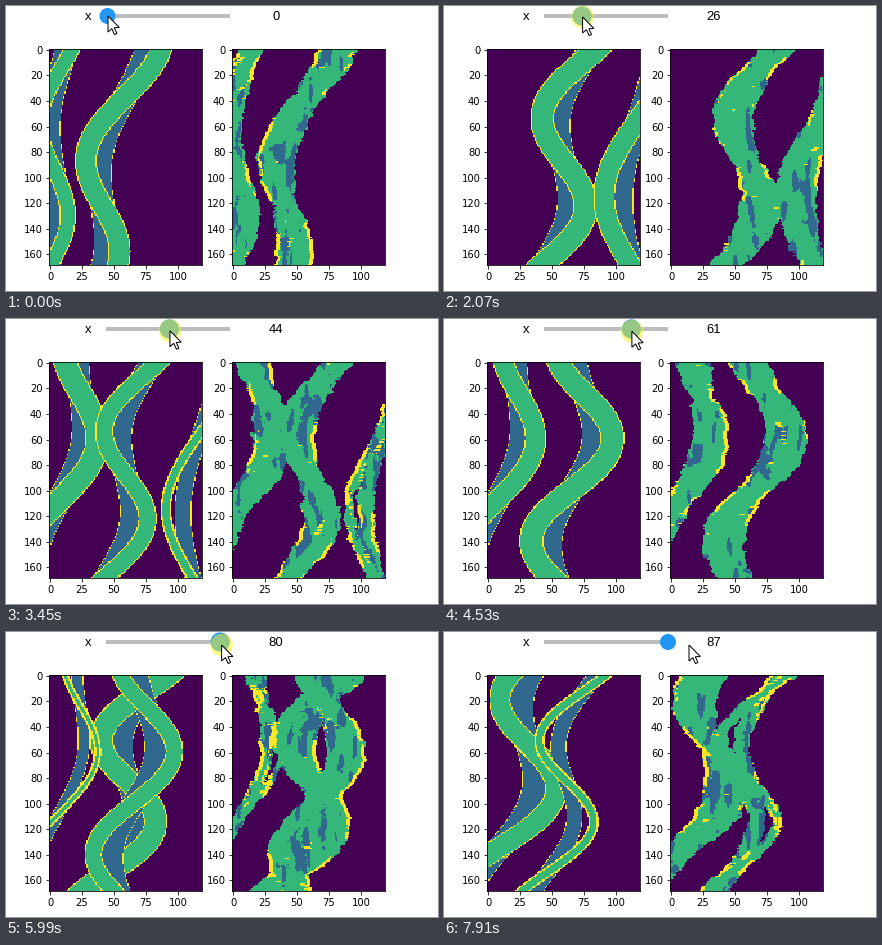
Write a matplotlib script that moves like this. It is 432x285 px and loops after 8 s.

```python
import numpy as np
import matplotlib.pyplot as plt
from matplotlib.animation import FuncAnimation
from matplotlib.colors import ListedColormap
from matplotlib.patches import Circle, Polygon, Rectangle

W, H = 432, 285
LOOP, STEP = 8000, 50
START, BEAT = 380, 76.4          # first slice change, time per slice
NY, NX = 169, 119
ROWS, COLS = np.mgrid[0:NY, 0:NX]
MUD, BAR, SAND, LEVEE = range(4)
FACIES = ListedColormap(["#440154", "#31688e", "#35b779", "#fde725"])

LIFE = 3150                      # time to cut from a channel's top to its base
HALF_WIDTH = 9.5
BAR_BEND = 0.45                  # the older bar meanders less than the sand

# birth, mid, tilt, bend, apex row, period; youngest cuts the ones after it
CHANNELS = [
    (-2050, 4, -0.06, 13, 55, 155),
    (-1100, 49, -0.20, 21, 80, 170),
    (600, 116, -0.05, 24, 112, 230),
    (1350, 60, -0.18, 23.5, 49, 156),
    (2950, 12, -0.20, -21, 66, 168),
    (3800, 67.5, -0.13, -26.5, 62, 150),
    (5000, 61, -0.20, 27.8, 47, 142),
    (6400, 23, -0.27, -32, 94, 162),
]


def band(grid, centre, half, edge, label):
    slope = np.sqrt(1 + np.gradient(centre) ** 2)[:, None]
    d = np.abs(COLS - centre[:, None])
    grid[d < half * slope] = LEVEE
    grid[d < half * slope - edge * np.sqrt(slope)] = label


def paint(grid, t, birth, mid, tilt, bend, apex, period):
    age = (t - birth) / LIFE
    if not 0 <= age < 1:
        return
    y = np.arange(NY)
    axis = mid + tilt * (y - NY // 2)
    swing = -bend * np.cos(2 * np.pi * (y - apex) / period)
    sand = HALF_WIDTH * np.sqrt(1 - age ** 2)
    bar = HALF_WIDTH * np.sqrt(1 - age ** 6)
    band(grid, axis + BAR_BEND * swing, bar, 0.5, BAR)
    band(grid, axis + swing, sand, 0.9 + 0.25 * max(0, 6 - sand), SAND)


def truth(t):
    grid = np.zeros((NY, NX), int)
    for channel in reversed(CHANNELS):
        paint(grid, t, *channel)
    return grid


rng = np.random.default_rng(7)


def noise(sy, sx):
    """Two smooth fields that are mixed over time."""
    fy = np.fft.fftfreq(NY)[:, None] * sy
    fx = np.fft.fftfreq(NX)[None, :] * sx
    low = np.exp(-2 * np.pi ** 2 * (fy ** 2 + fx ** 2))
    pair = np.fft.ifft2(np.fft.fft2(rng.standard_normal((2, NY, NX))) * low).real
    return pair / pair.std()


N_WARP, N_BAR, N_LEVEE, N_FINE = (noise(*s) for s in
                                  [(2.5, 2), (6, 1.9), (8, 4), (0.9, 0.9)])


def mix(pair, t):
    a = t / 420
    return np.cos(a) * pair[0] + np.sin(a) * pair[1]


def shifted(grid, dx):
    return grid[ROWS, np.clip(np.rint(COLS + dx), 0, NX - 1).astype(int)]


def prediction(grid, t):
    """A rough guess at the truth: ragged rims, stray bars and levees."""
    fine = mix(N_FINE, t)
    lab = shifted(grid, 0.8 * mix(N_WARP, t) + 0.4 * fine)
    mask = lab > MUD
    out = np.where(mask, SAND, MUD)
    streak = mix(N_BAR, t) + 0.2 * fine
    out[mask & (streak > np.where(lab == BAR, 0.35, 1.4))] = BAR

    levee = mix(N_LEVEE, t) + 0.2 * fine
    rim = mask & ~(shifted(mask, 3) & shifted(mask, -3))
    crowd = sum(shifted(lab == LEVEE, d).astype(int) for d in range(-2, 3))
    out[rim & (levee > 0.6)] = LEVEE
    out[mask & (crowd > 1) & (levee > 0.25)] = LEVEE
    return out


plt.rcParams["font.family"] = "DejaVu Sans"
fig = plt.figure(figsize=(W / 72, H / 72), dpi=72, facecolor="white")


def panel(left):
    ax = fig.add_axes([left / W, 1 - 259.2 / H, 152.1 / W, 216 / H])
    im = ax.imshow(np.zeros((NY, NX)), cmap=FACIES, vmin=0, vmax=3,
                   aspect="auto", interpolation="nearest")
    ax.set_xticks(range(0, 101, 25))
    ax.set_yticks(range(0, 161, 20))
    ax.tick_params(labelsize=10)
    return im


left_im, right_im = panel(43.45), panel(226.45)

ui = fig.add_axes([0, 0, 1, 1])
ui.set(xlim=(0, W), ylim=(H, 0))
ui.axis("off")
ui.add_patch(Rectangle((100, 8), 124, 4, color="#bdbdbd", lw=0))
label_font = dict(family="Liberation Sans", size=13, ha="center", va="baseline")
ui.text(82.5, 14, "x", **label_font)
value_text = ui.text(270, 14, "0", **label_font)
thumb = ui.add_patch(Circle((102, 10), 8, color="#2196f3", lw=0))
glow = ui.add_patch(Circle((102, 11), 11.3, color="#f7f32a", alpha=0.55, lw=0))
ARROW = np.array([(0, 0), (0, 16), (3.8, 12.6), (6.5, 18.6), (8.9, 17.5),
                  (6.3, 11.7), (11.3, 11.5)])
arrow = ui.add_patch(Polygon(ARROW, fc="white", ec="black", lw=1))

PRESS, RELEASE = 210, 6700
DRAG_T = [START - 1, START, 1300, 2070, 3450, 4530, 5990, 6560]
DRAG_V = [0, 1, 15, 26, 44, 61, 80, 87]


def draw(i):
    t = i * STEP + STEP / 2
    slice_no = max(-1, np.floor((t - START) / BEAT))
    cut = START + BEAT * slice_no
    grid = truth(cut)
    left_im.set_data(grid)
    right_im.set_data(prediction(grid, cut))

    value = int(round(np.interp(t, DRAG_T, DRAG_V)))
    x = 101.5 + 1.408 * value
    held = PRESS <= t < RELEASE
    value_text.set_text(str(value))
    thumb.center = x, 10
    thumb.set_radius(9.6 if held else 8)

    tip_x = x + 0.5 + np.interp(t, [4530, 5990, 6600, 7000], [0, 1, 1, 20.5])
    tip_y = np.interp(t, [0, 2070, 5990], [10, 11, 13])
    arrow.set_xy(ARROW + (tip_x, tip_y))
    glow.center = tip_x, tip_y
    glow.set_visible(held)
    return left_im, right_im, value_text, thumb, glow, arrow


anim = FuncAnimation(fig, draw, frames=LOOP // STEP, interval=STEP,
                     repeat=True, repeat_delay=0, blit=False)
plt.show()
```
